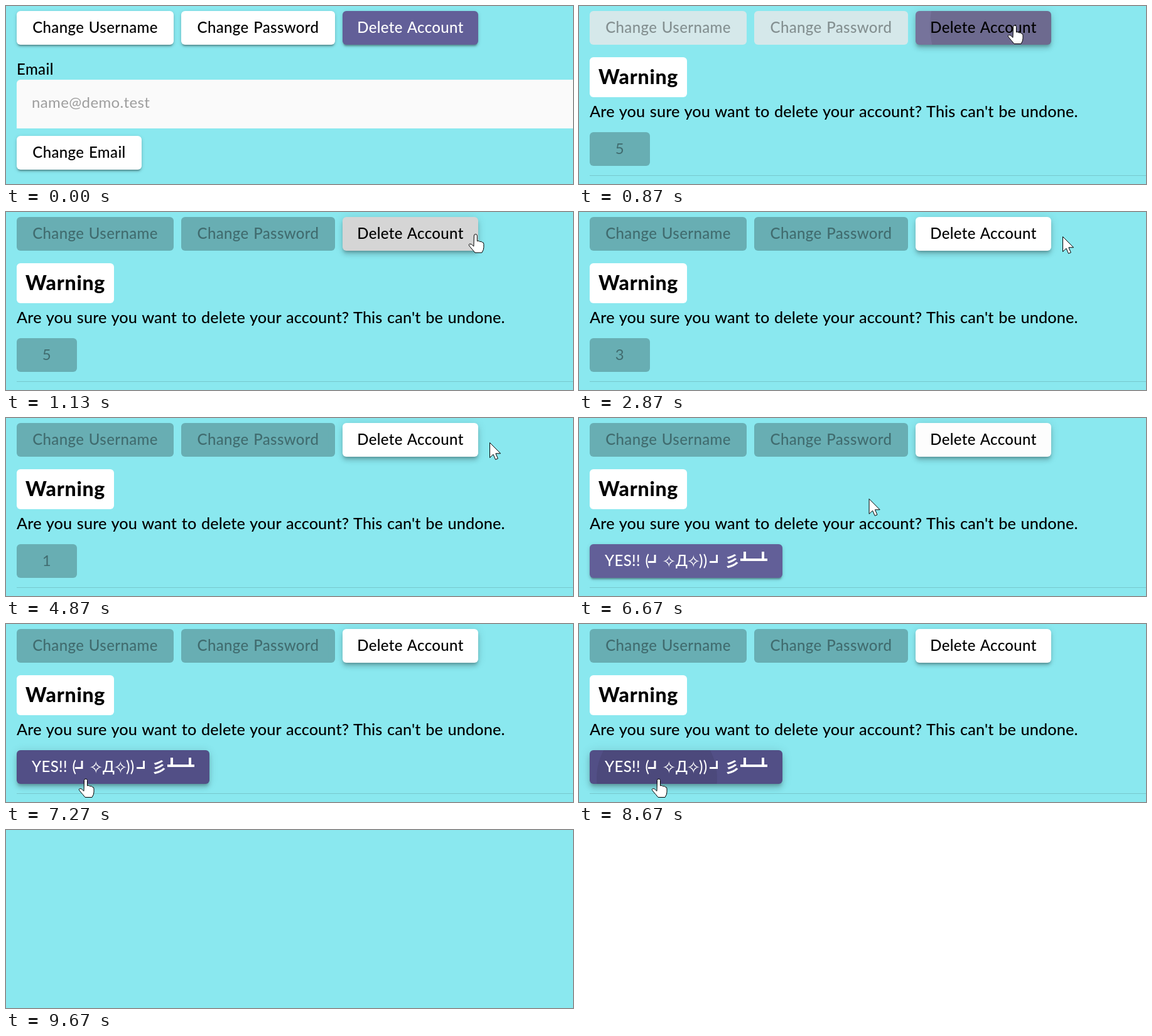
Write an HTML page that moves like this. It is 903 by 285 pixels and loops after 9.99 s.

```html
<!DOCTYPE html>
<html lang="en">
<head>
<meta charset="utf-8">
<title>Delete account confirmation</title>
<style>
  html, body { margin: 0; width: 100%; height: 100%; overflow: hidden; background: #8ae8ef; }
  .box { position: absolute; border-radius: 6px; background: #fff; }
  svg { position: absolute; left: 0; top: 0; }
  text { font: 500 24px Lato, "Noto Sans", sans-serif; letter-spacing: .36px; word-spacing: 1.2px; }
  .mid { text-anchor: middle; }
  .light { font-weight: 400; }
  .title { font-size: 32px; font-weight: 800; letter-spacing: .75px; }
  .body { font-size: 25.3px; letter-spacing: .08px; }
  .star { font: 27px "DejaVu Sans", sans-serif; letter-spacing: 0; }
  .cjk { font: 700 24px "Noto Sans CJK JP", "Noto Sans CJK SC", "Noto Sans CJK", sans-serif; }
  .strokes { fill: none; stroke: #fff; }
  .cursor { fill: #fff; stroke: #000; stroke-linejoin: round; }
</style>
</head>
<body>
<svg width="903" height="285" viewBox="0 0 903 285">
  <g id="labels">
    <text class="mid" x="142" y="43">Change Username</text>
    <text class="mid" x="401.5" y="43">Change Password</text>
  </g>
  <text id="deleteLabel" class="mid" x="644" y="43">Delete Account</text>
  <g id="emailText">
    <text x="17" y="110">Email</text>
    <text class="light" x="41" y="163" fill="#9e9e9e">name@demo.test</text>
    <text class="mid" x="116.5" y="243">Change Email</text>
  </g>
  <g id="warningText">
    <text class="title" x="31" y="125">Warning</text>
    <text class="body" x="17" y="178">Are you sure you want to delete your account? This can't be undone.</text>
  </g>
  <text id="count" class="mid light" x="65" y="237" fill-opacity=".38"></text>
  <g id="yesText" fill="#fff">
    <text x="41" y="237">YES!! (</text>
    <text class="star" x="132" y="239">✧</text>
    <text x="154" y="237">Д</text>
    <text class="star" x="171" y="239">✧</text>
    <text x="191" y="237">))</text>
    <text class="cjk" x="232" y="238">彡</text>
    <path class="strokes" stroke-width="3" d="M110 230.5H121V219M208 230.5H219.5V219"/>
    <path class="strokes" stroke-width="4" d="M257 227H300M264 214V227M293 214V227"/>
  </g>
  <g id="cursor">
    <path id="arrow" class="cursor" d="M.5 .5V24.5L6 19.3L9.6 27.5L13.4 25.9L9.9 17.8H17.6Z"/>
    <path id="hand" class="cursor" d="M-2.5 1.5a2.5 2.5 0 0 1 5 0v8.5q3-1.5 4 1q3-1.2 4 1q2.5-.3 2.5 3v5q0 4-3 8.5h-11q-4-5-8-9.5q-3-3.5-.5-4.5q2.5-.8 6.5 4z"/>
  </g>
</svg>
<script>
const LOOP = 9990, FPS = 15;
const ASK = 840, CONFIRM = 5840, LEAVE = 9640;
const WHITE = [255, 255, 255, 1], GREY = [213, 213, 213, 1], DISABLED = [0, 0, 0, .25];
const PURPLE = [98, 95, 152, 1], DARK = [82, 79, 134, 1];

const $ = id => document.getElementById(id);
const svg = document.querySelector('svg');
const clamp = p => Math.min(1, Math.max(0, p));
const smooth = p => p * p * (3 - 2 * p);
const easeOut = power => p => 1 - (1 - p) ** power;
const mix = (a, b, p) => a + (b - a) * p;

// Premultiplied, as browsers blend translucent colours.
function mixColor(a, b, p) {
  const alpha = mix(a[3], b[3], p);
  return [0, 1, 2].map(i => mix(a[i] * a[3], b[i] * b[3], p) / alpha).concat(alpha);
}

// Each step is [start, target value, duration].
function follow(value, steps, t, blend = mix, ease = smooth) {
  for (const [start, to, duration = 250] of steps) {
    value = blend(value, to, ease(clamp((t - start) / duration)));
  }
  return value;
}

function box(x, y, w, h, css = '') {
  const el = document.createElement('div');
  el.className = 'box';
  el.style.cssText = `left:${x}px;top:${y}px;width:${w}px;height:${h}px;${css}`;
  svg.before(el);
  return el;
}

const username = box(17, 8, 250, 54);
const password = box(279, 8, 245, 54);
const del = box(536, 8, 216, 54);
const field = box(17, 118, 886, 77.5, 'background:#fafafa;border-radius:6px 0 0 0');
const changeEmail = box(17, 208, 199, 54);
const warning = box(17, 82, 155, 64);
const countBox = box(17, 202, 96, 54, 'background:rgba(0,0,0,.25)');
const yes = box(17, 202, 307, 54);
const rule = box(17, 271, 886, 1, 'background:rgba(0,0,0,.14);border-radius:0');

const deleteButton = {
  el: del, fill: PURPLE,
  fills: [[560, DARK], [781, GREY], [1060, WHITE, 140], [6400, GREY], [6450, WHITE]],
  lifts: [[560, 4], [8610, 2, 120]],
  ripple: { center: '158px 24px', start: 777, fade: 867 }
};
const yesButton = {
  el: yes, fill: DISABLED,
  fills: [[CONFIRM - 59, PURPLE], [6840, DARK], [9240, PURPLE, 160]],
  lifts: [[6840, 4], [8610, 8, 190], [9240, 2, 160]],
  ripple: { center: '107px 45px', start: 8603, fade: 9240 }
};

const travel = [
  [450, [694, 32], 217], [930, [770, 39], 270], [6395, [127, 249], 872], [9210, [125, 290], 190]
];
const cursorAxis = (axis, from, power, t) =>
  follow(from, travel.map(([start, to, ms]) => [start, to[axis], ms]), t, mix, easeOut(power));

const shadow = lift =>
  `0 4px ${lift}px -2px rgba(0,0,0,.2),` +
  `0 ${1.5 * lift}px ${1.75 * lift}px rgba(0,0,0,.14),` +
  `0 1.5px ${3.6 * lift}px rgba(0,0,0,.12)`;
const rgba = color => `rgba(${color.join()})`;

function show(visible, ...els) {
  for (const el of els) el.style.display = visible ? '' : 'none';
}

function paint({ el, fill, fills, lifts, ripple }, t) {
  const radius = Math.max(0, 1.5 * (t - ripple.start));
  const alpha = radius && follow(.08, [[ripple.fade, 0, 160]], t);
  el.style.backgroundColor = rgba(follow(fill, fills, t, mixColor));
  el.style.boxShadow = shadow(follow(2, lifts, t));
  el.style.backgroundImage = `radial-gradient(circle at ${ripple.center},` +
    `rgba(0,0,0,${alpha}) ${radius}px, transparent ${radius + 1}px)`;
}

function over(el, x, y) {
  const left = x - el.offsetLeft, top = y - el.offsetTop;
  return left >= 0 && top >= 0 && left <= el.offsetWidth && top <= el.offsetHeight;
}

function render(time) {
  const t = Math.floor(time * FPS / 1000) * 1000 / FPS;
  const blank = t > LEAVE;
  const asking = t > ASK && !blank;
  const confirmed = t > CONFIRM;

  show(!blank, username, password, del, $('labels'), $('deleteLabel'));
  show(!asking && !blank, field, changeEmail, $('emailText'));
  show(asking, warning, rule, $('warningText'));
  show(asking && !confirmed, countBox, $('count'));
  show(asking && confirmed, yes, $('yesText'));

  for (const el of [username, password]) {
    el.style.backgroundColor = rgba(follow(WHITE, [[781, DISABLED]], t, mixColor));
    el.style.boxShadow = asking ? 'none' : shadow(2);
  }
  changeEmail.style.boxShadow = shadow(2);
  $('labels').setAttribute('fill-opacity', asking ? .38 : 1);
  $('deleteLabel').setAttribute('fill', asking ? '#000' : '#fff');
  $('count').textContent = 5 - Math.max(0, Math.floor((t - ASK) / 1000));
  paint(deleteButton, t);
  paint(yesButton, t);

  const x = cursorAxis(0, 900, 1.75, t), y = cursorAxis(1, 60, 1.5, t);
  const pointing = over(del, x, y) || (confirmed && over(yes, x, y));
  show(t > 460 && !blank, $('cursor'));
  show(pointing, $('hand'));
  show(!pointing, $('arrow'));
  $('cursor').setAttribute('transform', `translate(${x} ${y})`);
}

const start = performance.now();
function tick() {
  render((performance.now() - start) % LOOP);
  requestAnimationFrame(tick);
}
tick();
</script>
</body>
</html>
```
